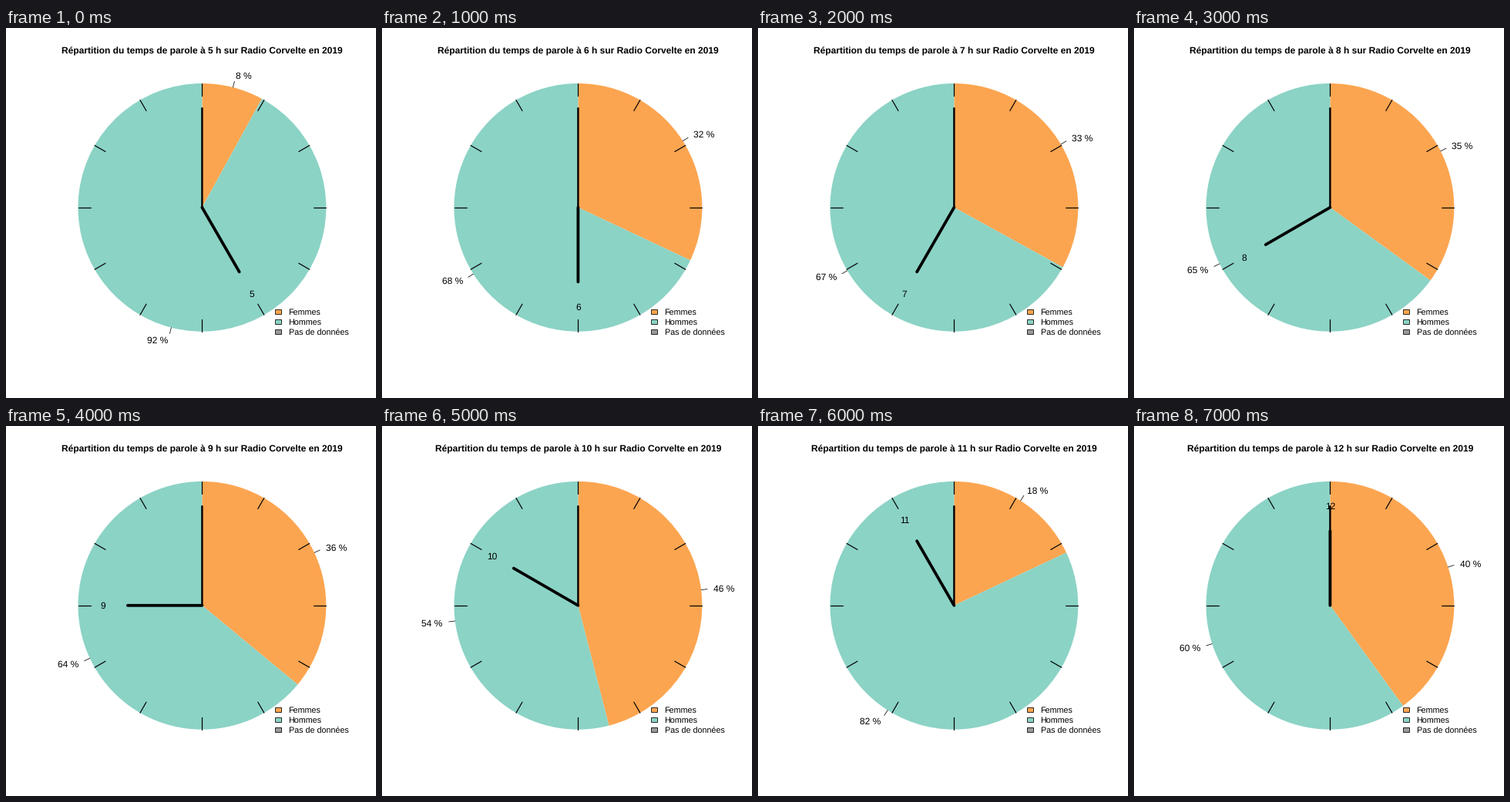
A matplotlib script that plays this animation: 480 px wide and 480 px high, repeating every 8000 ms.

```python
import numpy as np
import matplotlib.pyplot as plt
from matplotlib.animation import FuncAnimation
from matplotlib.patches import Rectangle, Wedge

plt.rcParams["font.family"] = "Liberation Sans"
plt.rcParams["text.hinting"] = "none"

SIZE = 480
PX = 0.72                    # points per pixel at 100 dpi
CX, CY, R = 254.4, 232.8, 160.9
ORANGE, TEAL, GREY = "#FCA550", "#8BD3C5", "#9A9A9A"
FIRST_HOUR = 5
WOMEN = [8, 32, 33, 35, 36, 46, 18, 40]   # percent, one per hour

fig = plt.figure(figsize=(SIZE / 100, SIZE / 100), dpi=100, facecolor="white")
ax = fig.add_axes([0, 0, 1, 1])
ax.set(xlim=(0, SIZE), ylim=(SIZE, 0))
ax.axis("off")


def polar(turn, r):
    """Point at a clockwise fraction of a turn from the top."""
    a = 2 * np.pi * turn
    return CX + R * r * np.sin(a), CY - R * r * np.cos(a)


def spoke(turn, r0, r1):
    return np.transpose([polar(turn, r0), polar(turn, r1)])


def line(width, cap="round", z=3, snap=None):
    return ax.plot([], [], color="black", lw=width * PX,
                   solid_capstyle=cap, zorder=z, snap=snap)[0]


def text(x, y, s="", size=12, **kw):
    return ax.text(x, y, s, fontsize=size * PX, va="baseline", zorder=5, **kw)


def slice_of(color):
    return ax.add_patch(Wedge((CX, CY), R, -90, 270, fc=color, ec="none", lw=0))


women, men = slice_of(ORANGE), slice_of(TEAL)
for k in range(12):
    line(1.2).set_data(*spoke(k / 12, 0.9, 1))

minute_hand = line(2.4, z=4, snap=False)
minute_hand.set_data(*spoke(0, 0, 0.8))
hour_hand = line(3.8, z=4, snap=False)
leaders = [line(0.75), line(0.75)]
shares = [text(0, 0), text(0, 0)]
hour_text = text(0, 0, ha="center")
title = text(CX, 34, ha="center", weight="bold")

legend = [("Femmes", ORANGE), ("Hommes", TEAL), ("Pas de données", GREY)]
for i, (name, color) in enumerate(legend):
    y = 13 * i
    ax.add_patch(Rectangle((349.3, 364.6 + y), 7.8, 6.5, fc=color,
                           ec="black", lw=0.8 * PX, zorder=5))
    text(366.6, 372 + y, name, size=10.8)


def update(i):
    hour, pct = FIRST_HOUR + i, WOMEN[i]
    edge = -90 + 3.6 * pct
    women.set_theta2(edge)
    men.set_theta1(edge)

    middles = (pct / 200, pct / 200 + 0.5)
    for turn, value, leader, label in zip(middles, (pct, 100 - pct), leaders, shares):
        leader.set_data(*spoke(turn, 1, 1.05))
        x, y = polar(turn, 1.1)
        label.set(position=(x, y + 4.4), text=f"{value} %",
                  ha="left" if x > CX else "right")

    hour_hand.set_data(*spoke(hour / 12, 0, 0.6))
    x, y = polar(hour / 12, 0.8)
    hour_text.set(position=(x, y + 4.4), text=str(hour))
    title.set_text(f"Répartition du temps de parole à {hour} h "
                   "sur Radio Corvelte en 2019")
    return []


anim = FuncAnimation(fig, update, frames=len(WOMEN), init_func=lambda: update(0),
                     interval=1000, repeat=True, repeat_delay=0, blit=False)
plt.show()
```
